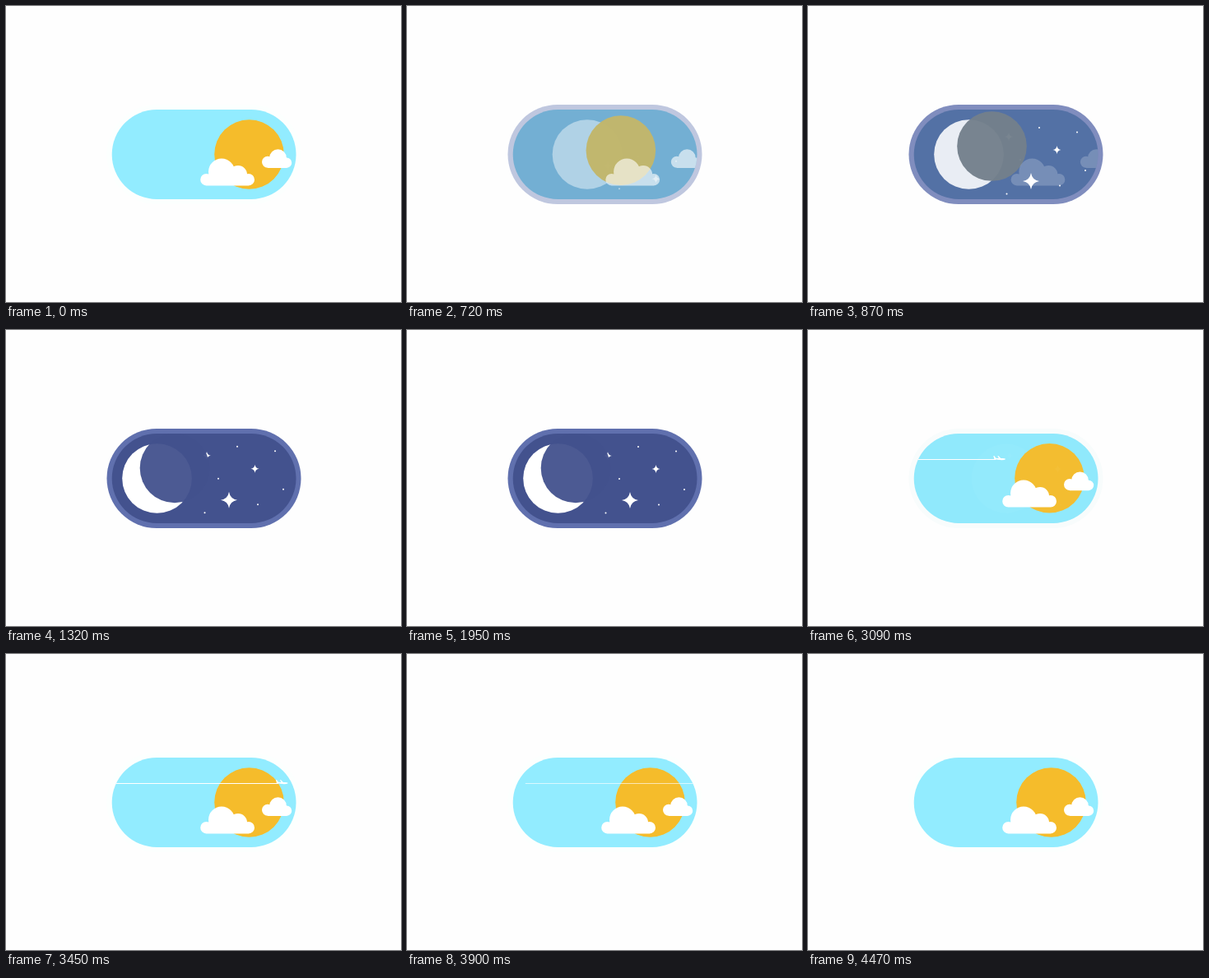
Write an HTML page with a canvas that moves like this. It is 480 px wide and 360 px high and loops after 4.5 s.

```html
<!DOCTYPE html>
<html lang="en">
<head>
<meta charset="utf-8">
<title>Day and night switch</title>
<style>
html, body { margin: 0; width: 100%; height: 100%; overflow: hidden; background: #fefefe; }
canvas { display: block; }
</style>
</head>
<body>
<canvas id="stage" width="480" height="360"></canvas>
<script>
const ctx = document.getElementById('stage').getContext('2d');
const LOOP = 4500, DUSK = 575, DAWN = 2607, FADE = 600;
const SKY = [[146, 236, 255], [67, 82, 142]];
const RIM = [[252, 255, 254], [96, 112, 174]];
const SUN = [245, 188, 43];

// Circles as [x, y, radius]; base as [x, y, width, height]
const BIG_CLOUD = {
  bumps: [[243.5, 211.2, 7.3], [262, 201.5, 16], [282, 205, 11], [294.7, 211.2, 7.3]],
  base: [243.5, 205, 51, 13.5], drift: 13, rise: 104
};
const SMALL_CLOUD = {
  bumps: [[318, 189.7, 7], [330.5, 184.5, 10.3], [341, 190.7, 6.2]],
  base: [318, 188, 23, 9], drift: 25, rise: 62
};
const SPARKLES = [[244, 153, 4.8], [302.5, 169, 5], [271, 207, 10]];
const DOTS = [[281, 142], [327, 147.5], [258, 181], [337, 194], [306, 212.5], [241.5, 222.5]];
const STAR_RISE = 82;

const clamp = v => Math.max(0, Math.min(1, v));
const lerp = (a, b, k) => a + (b - a) * k;
const mix = (a, b, k) => a.map((v, i) => lerp(v, b[i], k));
const rgb = c => `rgb(${c.map(Math.round)})`;

// cubic-bezier(.25, .1, .25, 1)
function ease(u) {
  u = clamp(u);
  const curve = (s, a, b) => 3 * s * (1 - s) * ((1 - s) * a + s * b) + s ** 3;
  let lo = 0, hi = 1;
  for (let i = 0; i < 20; i++) {
    const mid = (lo + hi) / 2;
    if (curve(mid, .25, .25) < u) lo = mid; else hi = mid;
  }
  return curve(lo, .1, 1);
}

// Damped spring from 0 to 1, with a small overshoot
function spring(ms) {
  const s = Math.max(0, ms) / 1000, w = 6.614;
  return 1 - Math.exp(-7.5 * s) * (Math.cos(w * s) + 7.5 / w * Math.sin(w * s));
}

function circle(x, y, r) {
  ctx.beginPath();
  ctx.arc(x, y, r, 0, 2 * Math.PI);
  ctx.fill();
}

function pill(x, y, w, h) {
  ctx.beginPath();
  ctx.roundRect(x, y, w, h, h / 2);
}

function layer(alpha, dx, dy, draw) {
  if (alpha <= 0) return;
  ctx.save();
  ctx.globalAlpha = clamp(alpha);
  ctx.translate(dx, dy);
  ctx.fillStyle = '#fff';
  draw();
  ctx.restore();
}

function drawCloud({ bumps, base }) {
  ctx.beginPath();
  for (const [x, y, r] of bumps) {
    ctx.moveTo(x + r, y);
    ctx.arc(x, y, r, 0, 2 * Math.PI);
  }
  ctx.rect(...base);
  ctx.fill();
}

function drawStars() {
  for (const [x, y, r] of SPARKLES) {
    const c = r * .14;
    ctx.beginPath();
    ctx.moveTo(x, y - r);
    ctx.quadraticCurveTo(x + c, y - c, x + r, y);
    ctx.quadraticCurveTo(x + c, y + c, x, y + r);
    ctx.quadraticCurveTo(x - c, y + c, x - r, y);
    ctx.quadraticCurveTo(x - c, y - c, x, y - r);
    ctx.fill();
  }
  for (const [x, y] of DOTS) circle(x, y, 1);
}

function drawPlane(t) {
  const nose = 146 + (t - 2760) * .285;
  const tail = 134 + 213 * clamp((t - 3600) / 840) ** 3;
  layer(1 - (t - 3600) / 840, 0, 0, () =>
    ctx.fillRect(tail, 157, Math.max(0, Math.min(nose - 12, 353) - tail), 1));
  layer(1, nose, 157, () => {
    ctx.fill(new Path2D('M0 0Q-1-1-4-1L-6-1L-9-4L-10-4L-8.5-1L-12-1.3L-14-4L-15-4L-14 0Q-8 1.5-2 1Z'));
  });
}

function draw(t) {
  const dawn = t >= DAWN;
  const night = dawn ? 1 - ease((t - DAWN) / FADE) : ease((t - DUSK) / FADE);
  const sky = mix(...SKY, night);

  ctx.clearRect(0, 0, 480, 360);
  ctx.fillStyle = rgb(mix(...RIM, night));
  pill(122.5, 120, 236, 121);
  ctx.fill();

  ctx.save();
  pill(128.7, 126, 223.8, 109);
  ctx.fillStyle = rgb(sky);
  ctx.fill();
  ctx.clip();

  const starLift = dawn ? 0 : STAR_RISE * (1 - spring(t - DUSK));
  const stars = () => layer(night * 1.25, dawn ? 1 - night : 0, starLift, drawStars);

  if (!dawn) stars();
  layer(night * 1.1, 0, 0, () => circle(lerp(242, 183.5, night), 180.5, 42.3));
  layer(1 - .05 * night, 0, 0, () => {
    ctx.fillStyle = rgb(mix(SUN, sky, night));
    circle(lerp(295.5, 205, night), lerp(180.5, 168, night), 42.3);
  });
  if (dawn) {
    stars();
    drawPlane(t);
  }

  const arrival = spring(t - DAWN);
  for (const cloud of [BIG_CLOUD, SMALL_CLOUD]) {
    const alpha = dawn ? arrival * 1.2 : 1 - night;
    const dx = dawn ? 0 : cloud.drift * night;
    const dy = dawn ? cloud.rise * (1 - arrival) : 0;
    layer(alpha, dx, dy, () => drawCloud(cloud));
  }
  ctx.restore();
}

const start = performance.now();
function tick() {
  draw((performance.now() - start) % LOOP);
  requestAnimationFrame(tick);
}
tick();
</script>
</body>
</html>
```
